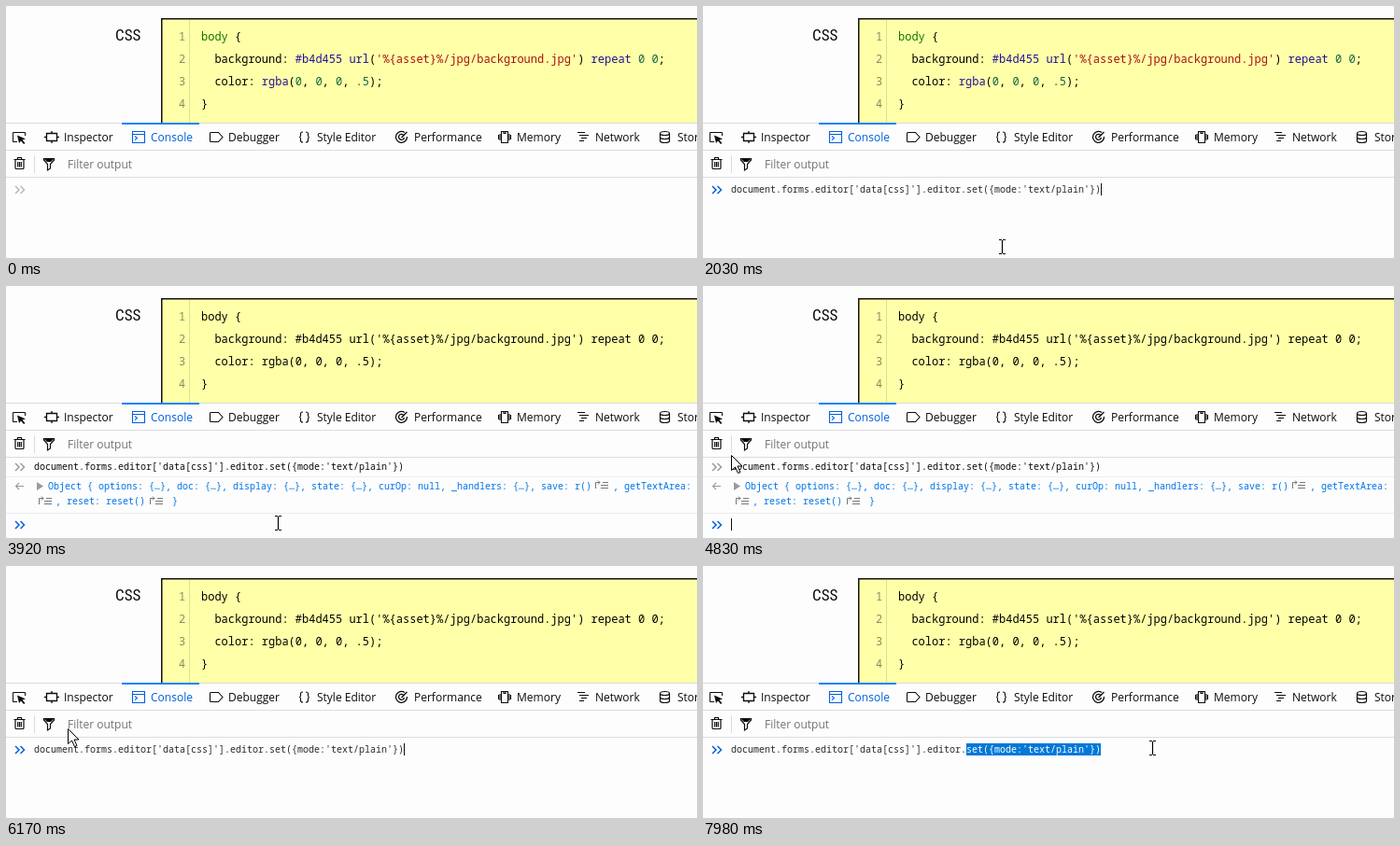
An HTML page with a canvas that plays this animation: 740 px wide and 270 px high, repeating every 8 s.

```html
<!DOCTYPE html>
<html lang="en">
<head>
<meta charset="utf-8">
<title>Console demo</title>
<style>
html, body { margin: 0; width: 100%; height: 100%; overflow: hidden; background: #fdfdfd; }
canvas { display: block; }
</style>
</head>
<body>
<canvas id="stage" width="740" height="270"></canvas>
<script>
const ctx = document.getElementById('stage').getContext('2d');
const LOOP = 8000;
const UI = '12px "Open Sans", "Noto Sans", sans-serif';
const CODE = '12px "Roboto Mono", "Noto Sans Mono", "DejaVu Sans Mono", monospace';
const MONO = '10px "Noto Sans Mono", "DejaVu Sans Mono", monospace';
const INK = '#0c0c0d', BLUE = '#0060df', GREY = '#9a9a9e', LINK = '#0074e8';
const CMD = "document.forms.editor['data[css]'].editor.set({mode:'text/plain'})";
const CH = 6, LEFT = 30, SEL = 42;

const TAG = '#117700', ATOM = '#221199', STR = '#aa1111', NUM = '#116644';
const LINES = [
  [['body', TAG], [' {']],
  [['  background: '], ['#b4d455 url', ATOM], ['('], ["'%{asset}%/jpg/background.jpg'", STR], [') '],
   ['repeat', ATOM], [' '], ['0', NUM], [' '], ['0', NUM], [';']],
  [['  color: '], ['rgba', ATOM], ['('], ['0', NUM], [', '], ['0', NUM], [', '], ['0', NUM], [', '], ['.5', NUM], [');']],
  [['}']]
];

// start, steps, from, to; each step lasts 60 ms
const MOVES = [
  [370, 5, [246, 262], [224, 202]],
  [1480, 3, [224, 202], [320, 258]],
  [3740, 5, [320, 258], [284, 253]],
  [4230, 5, [284, 253], [150, 222]],
  [4710, 3, [150, 222], [30, 181]],
  [4890, 2, [30, 181], [17, 168]],
  [6170, 4, [17, 168], [212, 190]],
  [6530, 8, [212, 190], [276, 199]],
  [7010, 6, [276, 199], [282, 199]],
  [7800, 4, [282, 199], [481, 195]]
];
const CARET = [[1110, 1600], [2030, 2650], [2890, 3680], [4230, 4860], [5250, 6290], [6830, 7310], [7430, 7860]];

function pointer(t) {
  let pos = null;
  for (const [start, steps, a, b] of MOVES) {
    if (t < start) break;
    const k = Math.min(1, (Math.floor((t - start) / 60) + 1) / steps);
    pos = a.map((v, i) => Math.round(v + (b[i] - v) * k));
  }
  return pos;
}

function text(s, x, y, font, color = INK) {
  ctx.font = font;
  ctx.fillStyle = color;
  ctx.fillText(s, x, y);
}
function box(x, y, w, h, color) {
  ctx.fillStyle = color;
  ctx.fillRect(x, y, w, h);
}
function draw(d, color = INK, width = 1, fill) {
  const p = new Path2D(d);
  if (fill) { ctx.fillStyle = fill; ctx.fill(p); }
  if (width) { ctx.strokeStyle = color; ctx.lineWidth = width; ctx.stroke(p); }
}

function editor(plain) {
  text('CSS', 117, 37, 'condensed 17px "Roboto Condensed", Roboto, sans-serif');
  box(166, 13, 574, 113, '#ffffa8');
  box(166, 13, 574, 1.5, '#111');
  box(166, 13, 1.5, 113, '#111');
  box(196, 15, 1, 111, '#dddda0');
  LINES.forEach((line, i) => {
    const y = 37 + i * 24;
    text(i + 1, 185, y, CODE, '#8c8c62');
    let x = 209;
    for (const [s, color] of line) {
      text(s, x, y, CODE, plain ? '#000' : color || '#000');
      x += s.length * 7.2;
    }
  });
}

function tabs() {
  box(0, 125, 740, 145, '#fdfdfd');
  box(0, 125, 740, 1, '#dcdcde');
  box(0, 154, 740, 1, '#dcdcde');
  box(0, 183, 740, 1, '#dcdcde');
  box(124, 125, 83, 2, '#0a84ff');
  const names = [['Inspector', 62], ['Console', 155], ['Debugger', 238], ['Style Editor', 333],
    ['Performance', 437], ['Memory', 547], ['Network', 631], ['Storage', 719]];
  for (const [s, x] of names) text(s, x, 145, UI, s === 'Console' ? BLUE : INK);

  draw('M12 145.5H7.500V135.500H20.500V139');
  draw('M12 138.500L21 142.500L17.500 143.500L20.500 147L19 148L16 144.500L14 147Z', INK, 0, INK);
  draw('M43.500 136.500H54.500V144.500H43.500ZM41 140.500H43M55 140.500H57M49 134V136M49 145V147', INK, 1.3);
  draw('M135.500 134.500H148.500V146.500H135.500ZM136 137.500H148M138 139.500L140.500 141.500L138 143.500', BLUE, 1.1);
  draw('M219.500 135.500H227.500L232 140.500L227.500 145.500H219.500Q218.500 145.500 218.500 144.500V136.500Q218.500 135.500 219.500 135.500Z', INK, 1.1);
  draw('M318 135Q315.500 135 315.500 137V139Q315.500 140.500 314 140.500Q315.500 140.500 315.500 142V144Q315.500 146 318 146'
    + 'M321 135Q323.500 135 323.500 137V139Q323.500 140.500 325 140.500Q323.500 140.500 323.500 142V144Q323.500 146 321 146', INK, 1.1);
  draw('M427 135.500A6 6 0 1 0 429.500 140M425.500 138A3 3 0 1 0 426.500 141M423.500 141L429.500 135', INK, 1.3);
  draw('M530.500 134.500H537.500V146.500H530.500ZM533 134.500V136.500H535V134.500M529 137V144M539 137V144M527.500 138V143M540.500 138V143', INK, 1.1);
  draw('M612 135.500H620M614 138.500H624M616 141.500H622M614 144.500H619', INK, 1.1);
  draw('M700.500 136.500A5 2 0 0 1 710.500 136.500A5 2 0 0 1 700.500 136.500V144.500A5 2 0 0 0 710.500 144.500V136.500M700.500 140.500A5 2 0 0 0 710.500 140.500', INK, 1.2);
}

function filterBar(hover, press) {
  if (hover) box(2, 159, 25, 21, press ? '#d7d7db' : '#e9e9ec');
  draw('M8.500 164.500H20.500M12.500 164V162.500H16.500V164M10 165V173.500Q10 174.500 11 174.500H18Q19 174.500 19 173.500V165M12.700 167V172.500M14.500 167V172.500M16.300 167V172.500', INK, 1.2);
  box(30, 160, 1, 19, '#dcdcde');
  draw('M40.500 163.500H51.500V165L47.500 169.500V174L44.500 176V169.500L40.500 165Z', INK, 1.2);
  draw('M41 164H51L48 167H44Z', INK, 0, INK);
  text('Filter output', 66, 174, UI, '#737373');
}

function chevrons(y, color) {
  draw(`M10 ${y - 4}L14 ${y}L10 ${y + 4}M15.500 ${y - 4}L19.500 ${y}L15.500 ${y + 4}`, color, 1.5);
}

function jump(x, y) {
  draw(`M${x + .5} ${y + 4}V${y - 2.5}H${x + 5}M${x + 3} ${y - 4.500}L${x + 5} ${y - 2.500}L${x + 3} ${y - .5}`
    + `M${x + 8} ${y - 2.500}H${x + 14}M${x + 6} ${y + .5}H${x + 14}M${x + 6} ${y + 3.500}H${x + 14}`, '#77777b', 1);
}

function result() {
  draw('M19 214.500H11M14 211L10.500 214.500L14 218', GREY, 1.1);
  draw('M33 210L40 214.500L33 219Z', GREY, 0, GREY);
  text('Object { options: {…}, doc: {…}, display: {…}, state: {…}, curOp: null, _handlers: {…}, save: r()', 45, 218, MONO, LINK);
  jump(631, 213);
  text(', getTextArea:', 650, 218, MONO, LINK);
  jump(35, 230);
  text(', reset: reset()', 53, 234, MONO, LINK);
  jump(154, 230);
  text('}', 178, 234, MONO, LINK);
}

function output(t, mouse) {
  const echoed = t >= 2890 && t < 5250;
  const replied = t >= 3130 && echoed;
  const typed = (t >= 2030 && t < 2890) || t >= 5800;
  const y = replied ? 256 : echoed ? 217 : 197;
  if (echoed) {
    chevrons(194, GREY);
    text(CMD, LEFT, 197, MONO);
    box(0, 204, 740, 1, '#ededf0');
  }
  if (replied) {
    result();
    box(0, 243, 740, 1, '#ededf0');
  }
  chevrons(y, t < 1110 ? '#b8b8bc' : BLUE);

  let caret = LEFT;
  if (typed) {
    text(CMD, LEFT, 200, MONO, '#2a2a2e');
    caret += CMD.length * CH;
    if (t >= 7430) caret = LEFT + SEL * CH;
    if (t >= 7800) {
      const end = Math.min(CMD.length, Math.max(SEL, Math.round((mouse[0] - LEFT) / CH)));
      box(caret, 190, (end - SEL) * CH, 13, '#0078d7');
      text(CMD.slice(SEL, end), caret, 200, MONO, '#fff');
      caret = LEFT + end * CH;
    }
  }
  if (CARET.some(([a, b]) => t >= a && t < b)) box(caret, y - 7, 1, 13, INK);
}

function cursor([x, y], arrow) {
  ctx.save();
  ctx.translate(x, y);
  if (arrow) {
    draw('M.5 .5V16.500L4.500 13L7.500 19.500L10 18.500L7 12H12Z', '#000', 1, '#fff');
  } else {
    const beam = 'M-3 -7.500H0M1 -7.500H4M.5 -7V7M-3 7.500H0M1 7.500H4';
    draw(beam, '#fff', 2.5);
    draw(beam, '#000', 1.2);
  }
  ctx.restore();
}

function render(t) {
  const mouse = pointer(t);
  box(0, 0, 740, 270, '#fdfdfd');
  editor(t >= 2950);
  tabs();
  filterBar(t >= 4950 && t < 6170, t >= 5130 && t < 5250);
  output(t, mouse);
  if (mouse) cursor(mouse, t >= 4770 && t < 6290);
}

function tick(now) {
  render(now % LOOP);
  requestAnimationFrame(tick);
}
requestAnimationFrame(tick);
</script>
</body>
</html>
```
